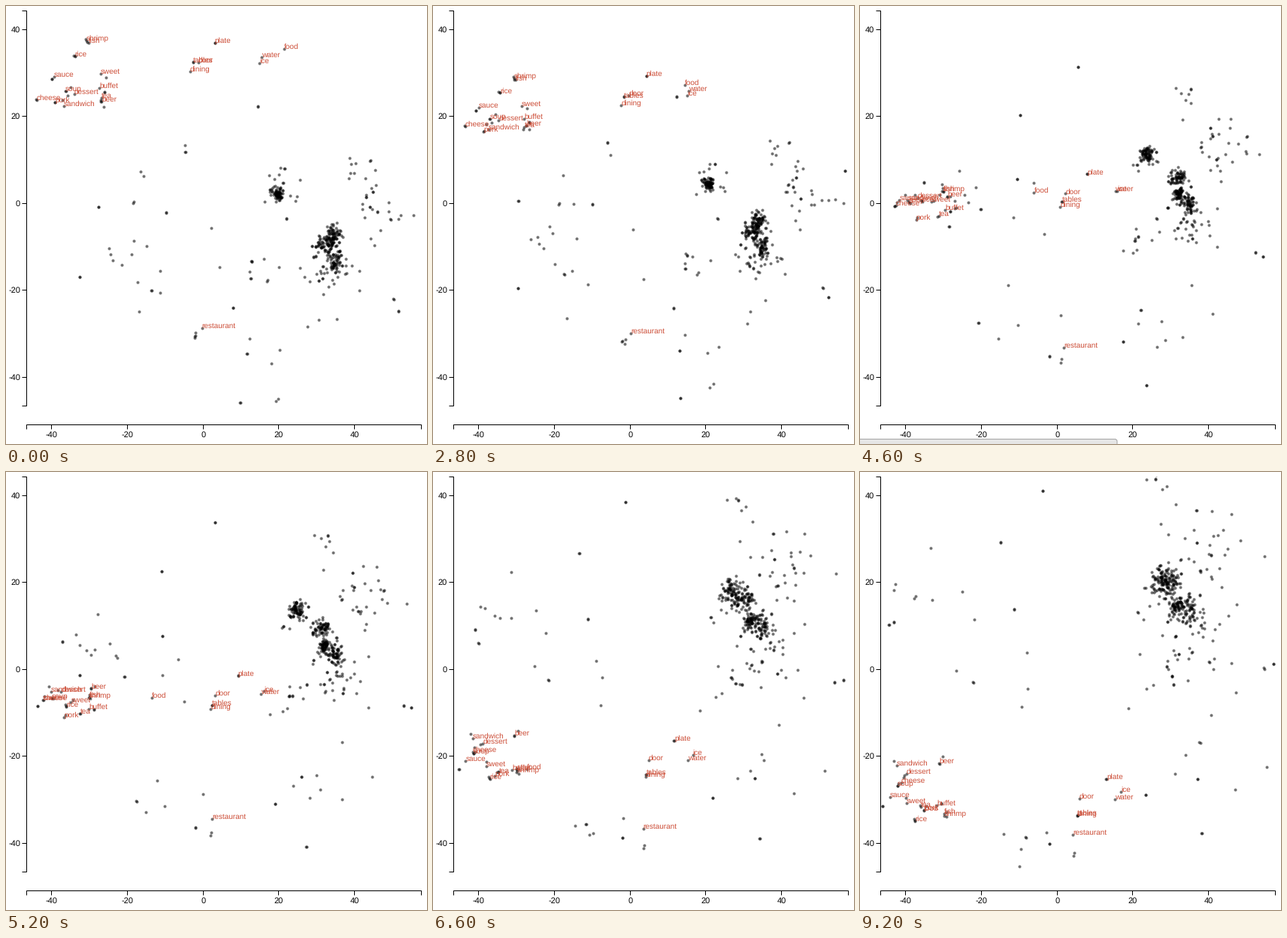
A matplotlib script for the animation above (9.4 s loop, 560 by 582 pixels).

```python
import numpy as np
import matplotlib.pyplot as plt
from matplotlib.animation import FuncAnimation
from matplotlib.patches import FancyBboxPatch, Rectangle

W, H = 560, 582
STEP, FRAMES = 200, 47
PT = 0.72  # points per pixel at 100 dpi
FONT = "Liberation Sans"
RED = "#cd4f39"
plt.rcParams["text.hinting"] = "none"

# Each label travels from its first point to its second, in pixels
WORDS = {
    "plate": (277.5, 49, 328, 408), "food": (370, 57, 85, 450),
    "water": (340, 68, 339, 435), "ice": (337, 76, 347, 425),
    "door": (256, 75, 292, 434), "tables": (249, 75, 289, 456),
    "dining": (245, 87, 289, 457), "restaurant": (260.5, 428, 283, 482),
    "fish": (110, 49, 112, 454), "shrimp": (107, 46, 112, 457),
    "rice": (91.5, 67, 73, 464), "sweet": (125.5, 90, 62, 440),
    "sauce": (64, 94, 40, 432), "cheese": (41, 125, 55, 413),
    "pork": (65, 128, 85, 449), "soup": (79, 113, 50, 417),
    "dessert": (91, 117, 62, 401), "buffet": (124, 109, 102, 443),
    "sandwich": (77, 133, 49, 390), "tea": (127, 122, 81, 445),
    "beer": (127, 127, 105, 387),
}

# Tight stacks of dots that stand apart from the clouds
STACKS = [
    (335, 134, 243, 25), (238, 194, 187, 93), (170, 261, 150, 279),
    (303, 401, 449, 408), (312, 527, 454, 481), (522, 406, 550, 255),
    (515, 390, 537, 262), (409, 333, 409, 199), (373, 282, 417, 283),
]

# Count, then centre and spread at the start and at the end
CLOUDS = [
    (64, (361, 250), 4.5, (403, 141), 9),     # small dense knot
    (12, (364, 243), 15, (393, 150), 17),     # its fringe
    (64, (434, 304), 6.5, (412, 147), 9),     # large knot, top
    (56, (427, 317), 6, (422, 179), 7),       # large knot, middle
    (50, (438, 337), 7, (438, 183), 8),       # large knot, foot
    (36, (430, 346), 19, (446, 215), 27),     # its fringe
    (26, (500, 270), 26, (470, 105), 25),     # east, rising
    (7, (462, 205), 14, (400, 30), 17),       # north-east, rising
    (8, (340, 340), 18, (385, 280), 20),      # between the knots
    (8, (366, 470), 38, (452, 370), 42),      # south, drifting east
    (10, (160, 325), 32, (85, 175), 42),      # west, rising
    (5, (187, 340), 36, (222, 505), 20),      # west, sinking
    (5, (205, 262), 40, (200, 275), 42),      # west, nearly still
    (3, (256, 435), 7, (288, 500), 12),       # below the middle
]


def jitter(rng, points, size):
    return points + rng.normal(0, size, points.shape)


def build_dots():
    rng = np.random.default_rng(12)
    words = np.array(list(WORDS.values()), float)
    foods = words[words[:, 0] < 140]
    clouds = [rng.normal((*a, *b), (sa, sa, sb, sb), (n, 4))
              for n, a, sa, b, sb in CLOUDS]
    stacks = jitter(rng, np.repeat(np.array(STACKS, float), 2, axis=0), 0.5)
    dots = np.vstack([words, jitter(rng, foods, 5), *clouds])
    twins = jitter(rng, dots[::5], 0.5)
    return np.vstack([dots, twins, stacks])


KNOT_T = np.array([1400, 2800, 3800, 4600, 5800, 6600, 7200], float)
KNOT_S = np.array([0, 0.122, 0.307, 0.486, 0.736, 0.859, 1])
SLOPE = np.gradient(KNOT_S, KNOT_T)
SLOPE[0] = 0


def progress(t):
    """Smooth cubic path through the knots of the drag."""
    t = min(max(t, KNOT_T[0]), KNOT_T[-1])
    i = min(np.searchsorted(KNOT_T, t, side="right") - 1, len(KNOT_T) - 2)
    h = KNOT_T[i + 1] - KNOT_T[i]
    u = (t - KNOT_T[i]) / h
    rise = u * u * (3 - 2 * u)
    return (KNOT_S[i] * (1 - rise) + KNOT_S[i + 1] * rise
            + h * u * (1 - u) * (SLOPE[i] * (1 - u) - SLOPE[i + 1] * u))


def place(path, s):
    return path[..., :2] * (1 - s) + path[..., 2:] * s


fig = plt.figure(figsize=(W / 100, H / 100), dpi=100, facecolor="white")
ax = fig.add_axes([0, 0, 1, 1])
ax.set_xlim(0, W)
ax.set_ylim(H, 0)
ax.axis("off")


def line(xs, ys):
    # Half-pixel coordinates are already crisp; snapping would shift them
    ax.plot(xs, ys, color="black", lw=PT, snap=False,
            solid_capstyle="butt", solid_joinstyle="miter")


def axis_label(x, y, value, ha):
    ax.text(x, y, str(value), family=FONT, size=11 * PT, color="black",
            ha=ha, va="baseline")


line([21.5, 27.5, 27.5, 21.5], [6.5, 6.5, 531.5, 531.5])
line([27.5, 27.5, 552.5, 552.5], [562.5, 556.5, 556.5, 562.5])
for v in range(-40, 41, 20):
    x = np.floor(262 + 5.037 * v) + 0.5
    y = np.floor(262 - 5.775 * v) + 0.5
    line([21.5, 27.5], [y, y])
    line([x, x], [556.5, 562.5])
    axis_label(19, y + 3.5, v, "right")
    axis_label(x, 573, v, "center")

plot_area = Rectangle((27, 6), 526, 526, transform=ax.transData)
paths = build_dots()
dots = ax.scatter(paths[:, 0], paths[:, 1], s=(4 * PT) ** 2, color="black",
                  alpha=0.55, linewidths=0, zorder=3)
dots.set_clip_path(plot_area)

labels = [
    (ax.text(p[0], p[1], word, family=FONT, size=10 * PT, color=RED,
             ha="left", va="baseline", zorder=4), np.array(p, float))
    for word, p in WORDS.items()
]

status = FancyBboxPatch((-10, 575.5), 352, 20, zorder=5, lw=PT,
                        boxstyle="round,pad=0,rounding_size=3",
                        fc="#e6e6e6", ec="#a4a4a4", visible=False)
ax.add_patch(status)


def draw(i):
    t = i * STEP
    s = progress(t)
    dots.set_offsets(place(paths, s))
    for text, path in labels:
        text.set_position(place(path, s))
    status.set_visible(4200 <= t < 5200)
    return [dots, status] + [text for text, _ in labels]


anim = FuncAnimation(fig, draw, frames=FRAMES, interval=STEP, repeat=True,
                     repeat_delay=0, blit=False)
plt.show()
```
